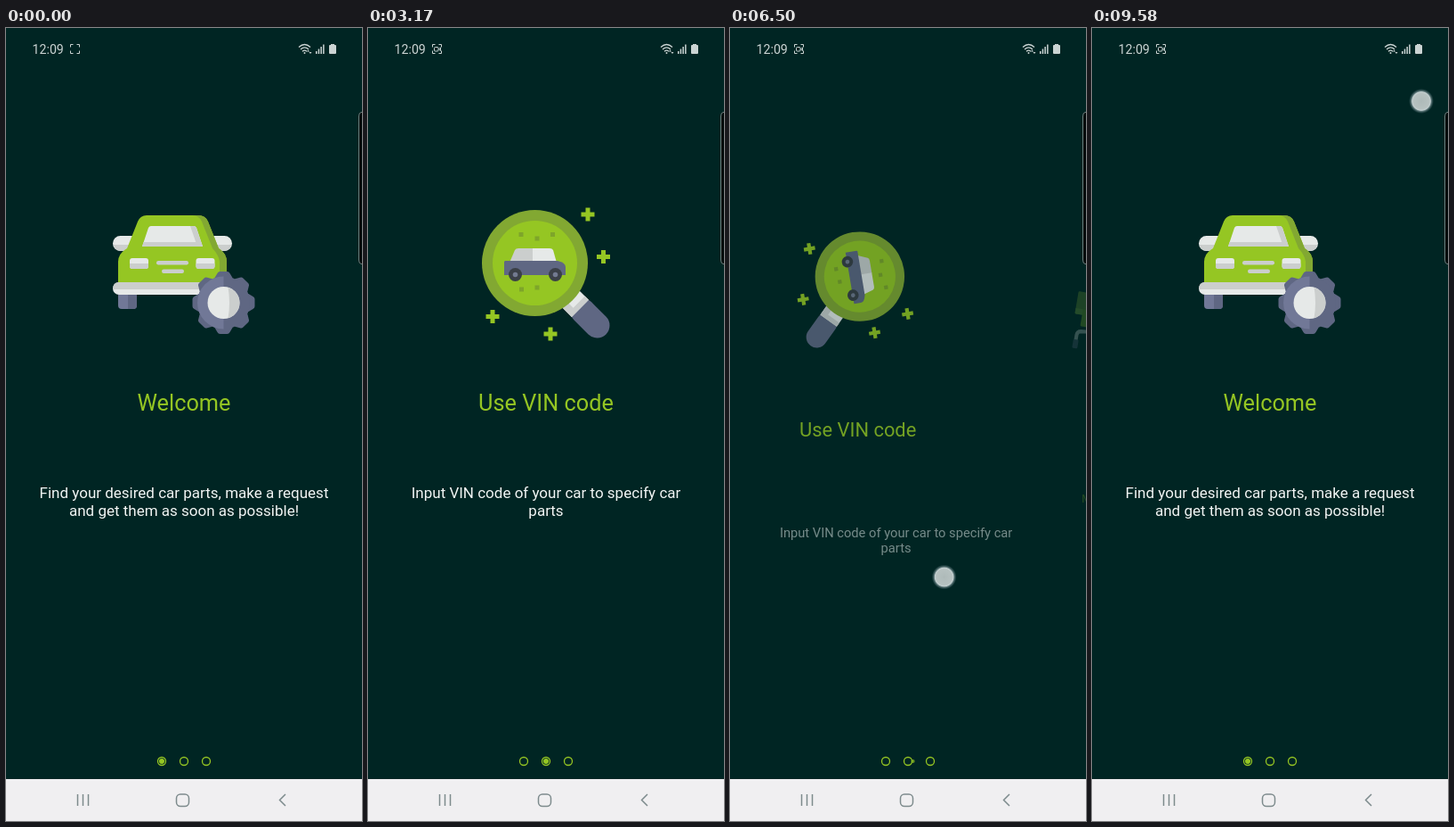
Recreate the animation shown at these times as an HTML page. Size 400 px wide and 889 px high, loop 9.66 s.

```html
<!DOCTYPE html>
<html lang="en">
<head>
<meta charset="utf-8">
<title>Onboarding</title>
<style>
  html, body { margin: 0; width: 100%; height: 100%; overflow: hidden; background: #002523; }
  svg { display: block; width: 400px; height: 889px; }
  text { font-family: Roboto, sans-serif; }
  .title { font-size: 25.3px; fill: #95c623; text-anchor: middle; }
  .desc { font-size: 17px; fill: #f2f5f4; text-anchor: middle; }
  .cta { font-size: 17px; font-weight: 500; fill: #e6ebe0; text-anchor: middle; }
  .lime { fill: #95c623; }
  .olive { fill: #82a832; }
  .white { fill: #e6e9e8; }
  .gray { fill: #cbcecd; }
  .slate { fill: #5f6783; }
  .steel { fill: #717897; }
  .line { fill: none; stroke: #7d8b8d; stroke-width: 1.5; }
</style>
</head>
<body>
<svg viewBox="0 0 400 889">
  <defs>
    <radialGradient id="glow">
      <stop offset="0" stop-color="#aebab9"/>
      <stop offset=".62" stop-color="#b6c1c0"/>
      <stop offset=".74" stop-color="#c3cfd0"/>
      <stop offset=".8" stop-color="#7d9395" stop-opacity=".8"/>
      <stop offset="1" stop-color="#47636a" stop-opacity="0"/>
    </radialGradient>

    <g id="car">
      <rect class="steel" x="126" y="288" width="21" height="27" rx="4"/>
      <path class="slate" d="M137 290H147V311Q147 315 143 315H137Z"/>
      <rect class="white" x="120" y="233" width="40" height="17" rx="8.5"/>
      <path class="gray" d="M121 243H160V250H129Q122 250 121 243Z"/>
      <rect class="white" x="215" y="233" width="39" height="17" rx="8.5"/>
      <path class="gray" d="M215 243H253Q252 250 245 250H215Z"/>
      <path class="lime" d="M126 288V262Q126 253 136 247L148 217Q151 210 158 210H216Q224 210 227 217L239 247Q248 253 248 262V288Z"/>
      <path class="olive" d="M209 210H216Q224 210 227 217L239 247Q248 253 248 262V288H240V262Q239 254 232 247L220 217Q217 210 209 210Z"/>
      <path class="white" d="M163 222H211Q213 222 214 224L221 245H153L160 224Q161 222 163 222Z"/>
      <path class="gray" d="M154.500 240H219.500L221 245H153ZM207 222H211Q213 222 214 224L221 245H215Z"/>
      <g id="lamp">
        <rect class="white" x="139" y="258" width="21" height="12" rx="3"/>
        <path class="gray" d="M139 264H160V267Q160 270 157 270H142Q139 270 139 267Z"/>
      </g>
      <use href="#lamp" x="74.500"/>
      <rect class="gray" x="169" y="261" width="36" height="4.500" rx="2.200"/>
      <rect class="gray" x="175" y="270.500" width="25" height="4.500" rx="2.200"/>
      <rect class="white" x="120" y="285" width="128" height="14" rx="7"/>
      <path class="gray" d="M120.500 293Q119.500 285 127 285H241Q247 286 248 293Z"/>
      <g id="gear" transform="translate(244.500 308)"></g>
    </g>

    <g id="lens">
      <g id="pluses" class="lime"></g>
      <g transform="translate(187.500 263.500) rotate(45)">
        <rect class="slate" x="62" y="-14" width="51" height="28" rx="14"/>
        <rect class="white" x="54" y="-13.500" width="18" height="27"/>
        <path class="gray" d="M66 -13.500H72V13.500H54V5H66Z"/>
      </g>
      <circle class="olive" cx="187.500" cy="263.500" r="59.500"/>
      <circle class="lime" cx="187.500" cy="263.500" r="47.500"/>
      <g id="specks" fill="#7ea52a"></g>
      <path class="gray" d="M159 263L165 249Q166 247 169 247H186V263Z"/>
      <path class="white" d="M185 247H204Q207 247 208 249L212 263H185Z"/>
      <path class="slate" d="M154 261H213Q222 263 222 268V277H153V262Z"/>
      <g id="tyre">
        <circle cx="165.500" cy="276.500" r="7.500" fill="#3b4047"/>
        <circle cx="165.500" cy="276.500" r="2.800" fill="#737a90"/>
      </g>
      <use href="#tyre" x="45"/>
    </g>

    <g id="cart">
      <rect class="olive" x="204" y="207" width="56" height="45" rx="3"/>
      <path d="M218 207V250H204V210Q204 207 207 207Z" fill="#9fcd42"/>
      <rect class="lime" x="176" y="225" width="47" height="25" rx="3"/>
      <path class="olive" d="M218 225H220Q223 225 223 228V244H218Z"/>
      <path d="M140 220H153Q162 220 163.500 229L171 303Q162 305 162 313.500Q162 323 171 323H256" fill="none" stroke="#e6e9e8" stroke-width="9" stroke-linecap="round" stroke-linejoin="round"/>
      <path class="white" d="M165 244H267Q270 244 270 247V287L262 304Q260 308 256 308H169Z"/>
      <path class="gray" d="M218 244H267Q270 244 270 247V287L262 304Q260 308 256 308H218ZM218 318.500H256A4.500 4.500 0 0 1 256 327.500H218Z"/>
      <rect class="slate" x="120" y="214" width="22" height="13" rx="3"/>
      <g id="slots"></g>
      <g id="wheel">
        <circle class="steel" cx="181" cy="332" r="14"/>
        <path class="slate" d="M181 318A14 14 0 0 1 181 346Z"/>
        <circle class="white" cx="181" cy="332" r="5"/>
      </g>
      <use href="#wheel" x="55.500"/>
    </g>
  </defs>

  <rect width="400" height="889" fill="#002523"/>
  <g id="pages"></g>

  <g id="dots" fill="none" stroke="#95c623" stroke-width="1.300"></g>
  <circle id="dot" class="lime" cy="822"/>

  <g fill="#cbd4d3">
    <text x="29.500" y="29" font-size="14.200">12:09</text>
    <path d="M72.500 21.500V18.500H75.500M79.500 18.500H82.500V21.500M82.500 25.500V28.500H79.500M75.500 28.500H72.500V25.500" fill="none" stroke="#cbd4d3"/>
    <g id="cam" fill="none" stroke="#cbd4d3">
      <rect x="74.500" y="21.500" width="4.500" height="4.500" rx="1"/>
      <path d="M79.500 23.700L81.500 22V25.500Z"/>
    </g>
    <g fill="none" stroke="#cbd4d3" stroke-width="1.300">
      <path d="M329 21.500Q335.500 15.500 342 21.500M331 24Q335.500 19.800 340 24M333 26.300Q335.500 24 338 26.300"/>
    </g>
    <circle cx="335.500" cy="28" r="1"/>
    <path d="M338 26.500L339.500 24.500L341 26.500ZM340.500 27L342 29L343.500 27Z"/>
    <path d="M348 26H349.500V29H348ZM350.700 23.500H352.200V29H350.700ZM353.400 21H354.900V29H353.400ZM356.100 18.500H357.600V29H356.100Z"/>
    <path d="M365 18H369V19H370Q371 19 371 20V28Q371 29 370 29H364Q363 29 363 28V20Q363 19 364 19H365Z"/>
  </g>

  <path d="M401 94.500H399Q396.500 95 396.500 99V260Q396.500 264 399 264.500H401Z" fill="#000b0b" stroke="#70807f"/>

  <rect y="842" width="400" height="47" fill="#f0eff1"/>
  <path class="line" d="M80.500 859V872M86.500 859V872M92.500 859V872M314 859L307.500 865.500L314 872"/>
  <rect class="line" x="191.500" y="859" width="14" height="13.500" rx="4.500"/>

  <circle id="touch" r="14" fill="url(#glow)"/>
</svg>
<script>
const LOOP = 9660;
const $ = id => document.getElementById(id);
const fill = (id, items, draw) => { $(id).innerHTML = items.map(draw).join(''); };

fill('gear', [0, 45, 90, 135], a =>
  `<path class="slate" transform="rotate(${a})" d="M-10 -28L-7 -33Q-6 -35 -4 -35H4Q6 -35 7 -33L10 -28V28L7 33Q6 35 4 35H-4Q-6 35 -7 33L-10 28Z"/>`);
$('gear').innerHTML += `<circle class="slate" r="29.500"/>
  <path class="steel" d="M0 -29.500A29.500 29.500 0 0 0 0 29.500Z"/>
  <circle class="white" r="18"/><path class="gray" d="M5 -17.300A18 18 0 0 1 5 17.300Q8 0 5 -17.300Z"/>`;
fill('pluses', [[247, 209], [264.5, 256.5], [140, 323.5], [205, 343]], ([x, y]) =>
  `<path d="M${x - 7.5} ${y - 2.5}h5v-5h5v5h5v5h-5v5h-5v-5h-5z"/>`);
fill('specks', [[172, 231.5], [190, 236], [207.5, 231.5], [172.5, 293], [190, 291]], ([x, y]) =>
  `<rect x="${x - 2.5}" y="${y - 2.5}" width="5" height="5"/>`);
fill('slots', [190, 218, 246], x =>
  `<rect class="slate" x="${x - 5}" y="262" width="10" height="29" rx="5"/>` +
  `<path class="steel" d="M${x} 262a5 5 0 0 0 -5 5v19a5 5 0 0 0 5 5z"/>`);
fill('dots', [175, 200, 225], x => `<circle cx="${x}" cy="822" r="4.500"/>`);

const PAGES = [
  ['car', 'Welcome', 'Find your desired car parts, make a request', 'and get them as soon as possible!'],
  ['lens', 'Use VIN code', 'Input VIN code of your car to specify car', 'parts'],
  ['cart', 'Make a request', 'Request an order with the chosen products', 'from the shopping cart', 'Get Started']
];
fill('pages', PAGES, ([icon, title, line1, line2, cta]) => `<g>
  <g><use href="#${icon}" x="-200" y="-276"/></g>
  <g><text class="title" y="8.700">${title}</text></g>
  <g><text class="desc" y="-4">${line1}</text><text class="desc" y="16">${line2}</text></g>
  <g>${cta ? `<rect class="lime" x="-169" y="-25" width="338" height="49" rx="9"/><text class="cta" y="6">${cta}</text>` : ''}</g>
</g>`);
const pages = [...$('pages').children];

// Pager position over time: [ms, page]
const SCROLL = [
  [0, 0], [400, 0], [1000, .17], [2000, .475], [2080, .5], [2450, .72], [2700, .96], [2900, 1],
  [3700, 1], [4000, .94], [4300, .65], [4500, .553], [4700, .55], [5080, .62], [5400, .78],
  [5600, .94], [5830, .993], [5950, 1], [6300, 1], [6650, 1.5], [6850, 1.9], [7100, 2],
  [7700, 2], [8000, 1.6], [8150, 1.15], [8300, 1], [8400, 1], [8650, .5], [8800, .1], [9000, 0], [LOOP, 0]
];
// Finger contacts: [from, to, x at first, page at first, y at start, y at end]
const TOUCHES = [
  [300, 2450, 359, 0, 650, 636], [3600, 5480, 111, 1, 575, 591], [6220, 6720, 330, 1, 620, 612],
  [7620, 8060, 90, 2, 600, 592], [8340, 8700, 90, 1, 602, 594], [9400, LOOP, 370, 0, 82, 82]
];

const slope = i => (SCROLL[i + 1][1] - SCROLL[i][1]) / (SCROLL[i + 1][0] - SCROLL[i][0]);
function tangent(i) {
  if (i < 1 || i > SCROLL.length - 2) return 0;
  const a = slope(i - 1), b = slope(i);
  return a * b > 0 ? 2 * a * b / (a + b) : 0;
}

// Monotone cubic through the scroll keys
function scrollAt(t) {
  let i = 0;
  while (i < SCROLL.length - 2 && t >= SCROLL[i + 1][0]) i++;
  const [t0, a] = SCROLL[i], [t1, b] = SCROLL[i + 1];
  const h = t1 - t0, u = (t - t0) / h, v = 1 - u;
  return v * v * (1 + 2 * u) * a + u * u * (3 - 2 * u) * b + h * u * v * (v * tangent(i) - u * tangent(i + 1));
}

function place(el, x, y, scale, alpha, turn = 0) {
  el.setAttribute('transform', `translate(${x} ${y}) rotate(${turn}) scale(${scale})`);
  el.setAttribute('opacity', Math.max(0, alpha));
}

function drawPage(page, p) {
  const d = Math.abs(p);
  page.style.display = d < 1 ? '' : 'none';
  if (d >= 1) return;
  const [icon, title, desc, cta] = page.children;
  const x = 200 + 281 * p, textScale = 1 - .607 * d, quick = 1 - 2.3 * d;
  place(icon, x, 276 + 66 * d, 1 - .7 * d, 1 - d, 360 * d);
  place(title, x + 29 * d, 420 + 138 * d, textScale, 1 - d);
  place(desc, 200 + 60 * p, 531 + 195 * d, textScale, quick);
  place(cta, x, 685 + 270 * d, textScale, quick);
}

function draw(t) {
  const s = scrollAt(t);
  pages.forEach((page, i) => drawPage(page, i - s));

  const k = Math.abs(1 - 2 * (s % 1));
  const dot = $('dot');
  dot.setAttribute('cx', 175 + 25 * s);
  dot.setAttribute('r', .7 + 2.3 * k);
  dot.setAttribute('opacity', .35 + .65 * k);

  const blink = t % 1000;
  $('cam').style.display = blink > 125 && blink < 665 ? '' : 'none';

  const hit = TOUCHES.find(([from, to]) => t >= from && t < to);
  const touch = $('touch');
  touch.style.display = hit ? '' : 'none';
  if (hit) {
    const [from, to, x, page, y0, y1] = hit;
    touch.setAttribute('cx', x - 400 * (s - page));
    touch.setAttribute('cy', y0 + (y1 - y0) * (t - from) / (to - from));
  }
}

const start = performance.now();
function tick() {
  draw((performance.now() - start) % LOOP);
  requestAnimationFrame(tick);
}
tick();
</script>
</body>
</html>
```
